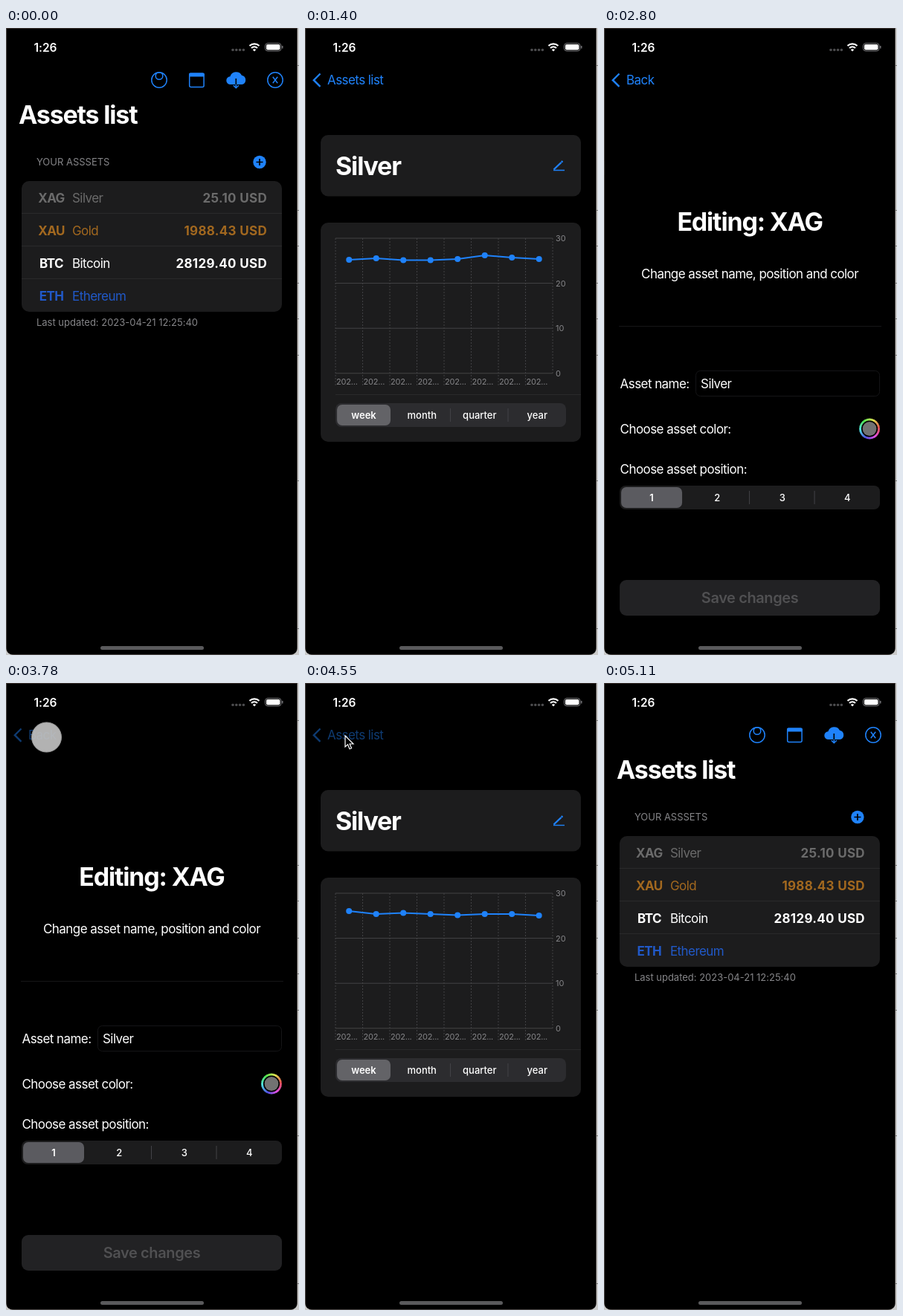
Recreate the animation shown at these times as an HTML page. Size 394x844 px, loop 5670 ms.

```html
<!DOCTYPE html>
<html lang="en">
<head>
<meta charset="utf-8">
<title>Assets list</title>
<style>
  html, body { margin: 0; width: 100%; height: 100%; overflow: hidden; background: #000; }
  svg { display: block; font-family: Inter, "Liberation Sans", sans-serif; }
</style>
</head>
<body>
<svg id="stage" width="394" height="844" viewBox="0 0 394 844"></svg>
<script>
const LOOP = 5670, STEP = 70, WIDTH = 390;
const BLUE = '#1f82fa', CARD = '#1c1c1d', GRAY = '#858588';

// Text centred vertically on y
function text(x, y, str, size, { fill = '#fff', weight = 400, anchor = 'start', id = '', ls } = {}) {
  ls ??= size >= 30 ? -.035 : size >= 24 ? 0 : size >= 20 ? -.02 : size >= 17 ? -.033 : -.001;
  return `<text id="${id}" x="${x}" y="${y + size * .36}" font-size="${size}" fill="${fill}"
    font-weight="${weight}" text-anchor="${anchor}" letter-spacing="${ls * size}">${str}</text>`;
}
const rect = (x, y, w, h, fill, r = 0, more = '') =>
  `<rect x="${x}" y="${y}" width="${w}" height="${h}" rx="${r}" fill="${fill}" ${more}/>`;
const line = (d, stroke, width = 1, more = '') =>
  `<path d="${d}" fill="none" stroke="${stroke}" stroke-width="${width}" ${more}/>`;
const circle = (x, y, r, fill, more = '') => `<circle cx="${x}" cy="${y}" r="${r}" fill="${fill}" ${more}/>`;
const group = (id, content, more = '') => `<g id="${id}" ${more}>${content}</g>`;
const page = (id, content) => group(id, rect(1, 0, WIDTH, 844, '#000') + group(id + 'Body', content));
const range = (n, f) => Array.from({ length: n }, (_, i) => f(i)).join('');

function segments(x, y, w, labels, back, thumb) {
  const cell = w / labels.length;
  return rect(x, y, w, 32, back, 8) + rect(x + 2, y + 2, cell - 5.5, 28, thumb, 7) +
    labels.map((s, i) => text(x + cell * (i + .5) - (i ? 0 : .8), y + 16, s, 13,
      { weight: i ? 500 : 600, anchor: 'middle' }) +
      (i > 1 ? line(`M${x + cell * i - .5} ${y + 7}v18`, '#434347') : '')).join('');
}

function assetsList() {
  const rows = [['XAG', 'Silver', '25.10 USD', '#6b6b6b'], ['XAU', 'Gold', '1988.43 USD', '#a2681f'],
    ['BTC', 'Bitcoin', '28129.40 USD', '#fff'], ['ETH', 'Ethereum', '', '#2159c8']];
  return text(41, 180.5, 'YOUR ASSSETS', 13, { fill: GRAY }) +
    circle(341, 180.5, 8.7, BLUE) + line('M336.5 180.5h9M341 176v9', '#000', 1.7) +
    rect(21, 206, 350, 176, CARD, 10) +
    group('pressed', '<path d="M21 250v-34q0-10 10-10h330q10 0 10 10v34z" fill="#3a3a3c"/>') +
    rows.map(([code, name, price, fill], i) => {
      const y = 228.5 + 44 * i;
      return text(61, y, code, 17, { fill, weight: 700, anchor: 'middle' }) + text(89, y, name, 17, { fill }) +
        text(351, y, price, 17, { fill, weight: 700, anchor: 'end', ls: .018 }) +
        (i ? line(`M21 ${y - 23}h350`, '#2a2a2b') : '');
    }).join('') +
    text(41, 396, 'Last updated: 2023-04-21 12:25:40', 13, { fill: GRAY });
}

function plot(id, ys) {
  const pts = ys.map((y, i) => [59.2 + 36.5 * i, y]);
  return group(id, line('M' + pts.join('L'), BLUE, 2) + pts.map(([x, y]) => circle(x, y, 4, BLUE)).join(''));
}

function details() {
  const loading = rect(21, 262, 350, 172, CARD, 10) +
    group('spinner', range(8, i => line('M0 -9V-17', '#fff', 5.6,
      `stroke-linecap="round" transform="translate(194.5 326.5) rotate(${-45 * i})"`))) +
    text(196, 375.5, 'Loading...', 24, { anchor: 'middle', fill: '#eee' });
  const chart = rect(21, 262, 350, 295, CARD, 10) +
    range(4, i => line(`M41 ${283 + 60.6 * i}h292`, '#434345') +
      text(337, 283 + 60.6 * i, 30 - 10 * i, 11, { fill: GRAY })) +
    range(9, i => line(`M${41 + 36.5 * i} 283V${i < 8 ? 483 : 465}`, '#434345', 1, 'stroke-dasharray="2 2"')) +
    range(8, i => text(42 + 36.5 * i, 476, '202...', 11, { fill: GRAY, ls: -.02 })) +
    plot('plotA', [312, 310, 312.5, 312.5, 311, 306, 309, 311]) +
    plot('plotB', [307, 311, 309.6, 311, 312.5, 311, 311, 313]) +
    line('M41 493.5h330', '#2a2a2b') +
    segments(41, 505, 310, ['week', 'month', 'quarter', 'year'], '#2c2c2f', '#636367');
  return rect(21, 144, 350, 82.5, CARD, 10) + text(41, 186, 'Silver', 34, { weight: 700 }) +
    line('M334 191.5h15', BLUE, 1.4) + line('M334.5 190.5l10-9.5', BLUE, 2.4) + line('M344.8 180.6l1.6-1.5', BLUE, 2.4) +
    group('loading', loading) + group('chart', chart);
}

function editor() {
  const wheel = range(24, i => {
    const at = k => [357 + 12.6 * Math.cos(k * Math.PI / 12), 539.5 - 12.6 * Math.sin(k * Math.PI / 12)];
    return line(`M${at(i - .1)}L${at(i + 1.1)}`, `hsl(${i * 15} 72% 60%)`, 2.8);
  });
  return text(196, 261, 'Editing: XAG', 34, { weight: 700, anchor: 'middle' }) +
    text(196, 331, 'Change asset name, position and color', 17, { anchor: 'middle' }) +
    line('M20 401.5h353', '#161618') +
    text(21.5, 479, 'Asset name:', 17) +
    rect(123.5, 461.5, 247, 34, 'none', 6, 'stroke="#151517"') + text(130, 479, 'Silver', 17) +
    text(21.5, 540, 'Choose asset color:', 17) + wheel + circle(357, 539.5, 9.4, '#727272') +
    text(21.5, 594, 'Choose asset position:', 17) +
    segments(21, 616, 350, [1, 2, 3, 4], CARD, '#5b5b60') +
    rect(21, 743, 350, 48, '#222224', 9) +
    text(196, 767, 'Save changes', 20, { fill: '#505052', weight: 600, anchor: 'middle' });
}

const outline = `stroke="${BLUE}" stroke-width="1.5"`;
const toolbar = group('toolbar',
  circle(206, 70, 10.2, 'none', outline) + circle(206, 64.5, 4.8, 'none', outline) +
  rect(246.7, 61.2, 19.4, 18.2, 'none', 2, outline) + rect(246, 60.5, 20.8, 5, BLUE, 1.5) +
  `<path d="M302 76a5.4 5.4 0 0 1-.6-10.8a8.5 8.5 0 0 1 15.6-1.5a6.3 6.3 0 0 1 .5 12.3z" fill="${BLUE}"/>` +
  line('M309.3 68v8', '#000', 1.6) + line('M309.3 76v4.5M305.8 77.2l3.5 3.5l3.5-3.5', BLUE, 1.5) +
  circle(362, 70, 10.2, 'none', outline) +
  line('M358.8 65.8l6.4 8.4M365.2 65.8l-6.4 8.4', BLUE, 1.5));

const navigation = text(0, 0, 'Assets list', 34, { weight: 700, id: 'largeTitle' }) +
  group('back', line('M20.5 61.5l-8.7 8.7l8.7 8.7', BLUE, 2.4, 'id="chevron"') +
    group('', text(0, 0, 'Assets list', 17, { fill: BLUE, id: 'backTitle' }), 'clip-path="url(#labelArea)"') +
    text(30, 70, 'Back', 17, { fill: BLUE, id: 'backWord' }));

const statusBar = text(37.5, 26, '1:26', 15.5, { weight: 600 }) +
  range(4, i => circle(305 + 4.8 * i, 29.5, 1.8, '#4c4c4e')) +
  line('M327.5 24a9.5 9.5 0 0 1 13 0M330 27a5.8 5.8 0 0 1 8 0', '#fff', 2.3) +
  '<path d="M331.8 29.2a3.2 3.2 0 0 1 4.4 0l-2.2 2.3z" fill="#fff"/>' +
  rect(348.5, 20.5, 21.5, 10.5, 'none', 3.5, 'stroke="#77777a"') + rect(350, 22, 18.5, 7.5, '#fff', 2) +
  line('M371.8 24v3.5', '#77777a', 1.4) + rect(127, 832, 139, 5, '#5a5a5c', 2.5);

const frame = rect(0, 0, 394, 844, '#c9c9c9') +
  [50, 245, 293, 343, 391, 440, 609, 808].map(y => rect(392, y, 2, 1, '#777')).join('') +
  rect(.5, -10, 391, 853.5, '#000', 9, 'stroke="#4a4644"') + rect(1, 0, 390, 1, '#3a302e');

document.getElementById('stage').innerHTML = `
  <clipPath id="screen"><path d="M1 1H391V835q0 8-8 8H9q-8 0-8-8z"/></clipPath>
  <clipPath id="labelArea"><path d="M18 40H394V150H18z"/></clipPath>` +
  frame +
  group('', page('list', assetsList()) + page('detail', details()) + page('edit', editor()) +
    toolbar + navigation + statusBar, 'clip-path="url(#screen)"') +
  circle(0, 0, 20, '#c2c2c2', 'id="touch" stroke="#999" fill-opacity=".92"') +
  '<path id="cursor" d="M0 0V15l3.5-3.2l2.5 6l2.6-1.1l-2.5-5.7H11z" fill="#000" stroke="#fff" stroke-width="1.2"/>';

const el = Object.fromEntries([...document.querySelectorAll('[id]')].map(e => [e.id, e]));
const clamp = v => Math.min(1, Math.max(0, v));
const mix = (a, b, k) => a + (b - a) * k;
const show = (e, on) => e.setAttribute('visibility', on ? 'inherit' : 'hidden');
const fade = (e, k) => e.setAttribute('opacity', clamp(k));
const move = (e, x, y = 0, s = 1) => e.setAttribute('transform', `translate(${x} ${y}) scale(${s})`);
const within = (t, a, b) => t >= a && t < b;

// Critically damped spring from 0 to 1
function spring(t) {
  const x = .019 * Math.max(0, t);
  return 1 - (1 + x) * Math.exp(-x);
}

const PUSH = [784, 2209], POP = [4600, 3930];
const TAPS = [[630, 350, 229], [2100, 341, 186], [3780, 54.5, 73], [4410, 54.5, 73]];

function render(t) {
  const [p, q] = PUSH.map((start, i) => spring(t - start) - spring(t - POP[i]));

  move(el.list, -.3 * WIDTH * p);
  move(el.detail, WIDTH * (1 - p) - .3 * WIDTH * q);
  move(el.edit, WIDTH * (1 - q));
  fade(el.listBody, 1 - .1 * p);
  fade(el.detailBody, 1 - .1 * q);
  show(el.detail, p > 0);
  show(el.edit, q > 0);

  show(el.pressed, within(t, 630, 840));
  show(el.loading, t < 1260);
  show(el.chart, t >= 1260);
  show(el.plotA, within(t, 1260, POP[1]));
  show(el.plotB, t >= POP[1]);
  const head = Math.floor((t - 960) / 100);
  [...el.spinner.children].forEach((spoke, i) => fade(spoke, .87 - .085 * ((i + head + 80) % 8)));

  const x = mix(17, 30, p), y = mix(116.5, 70, p);
  move(el.largeTitle, x, y, 1 - p / 2);
  fade(el.largeTitle, 1 - 1.6 * p);
  move(el.backTitle, x - 96 * q, y, 2 - p);
  fade(el.backTitle, 1.2 * p * (1 - q));
  move(el.backWord, 150 * (1 - q));
  fade(el.backWord, 2.5 * q - 1.5);
  fade(el.chevron, 10 * p - 9);
  fade(el.toolbar, 1 - p);
  fade(el.back, within(t, 3780, POP[1]) || within(t, 4410, POP[0]) ? .45 : 1);

  const tap = TAPS.find(([start]) => within(t, start, start + STEP));
  show(el.touch, tap);
  if (tap) move(el.touch, tap[1], tap[2]);

  const glide = clamp((t - 70) / 140), gliding = within(t, 70, 280);
  show(el.cursor, gliding || within(t, 4480, 4620));
  if (gliding) move(el.cursor, mix(74, 359, glide), mix(63, 214, glide));
  else move(el.cursor, 54, 71);
}

const began = performance.now();
function tick() {
  const t = (performance.now() - began) % LOOP;
  render(Math.floor(t / STEP) * STEP);
  requestAnimationFrame(tick);
}
tick();
</script>
</body>
</html>
```
